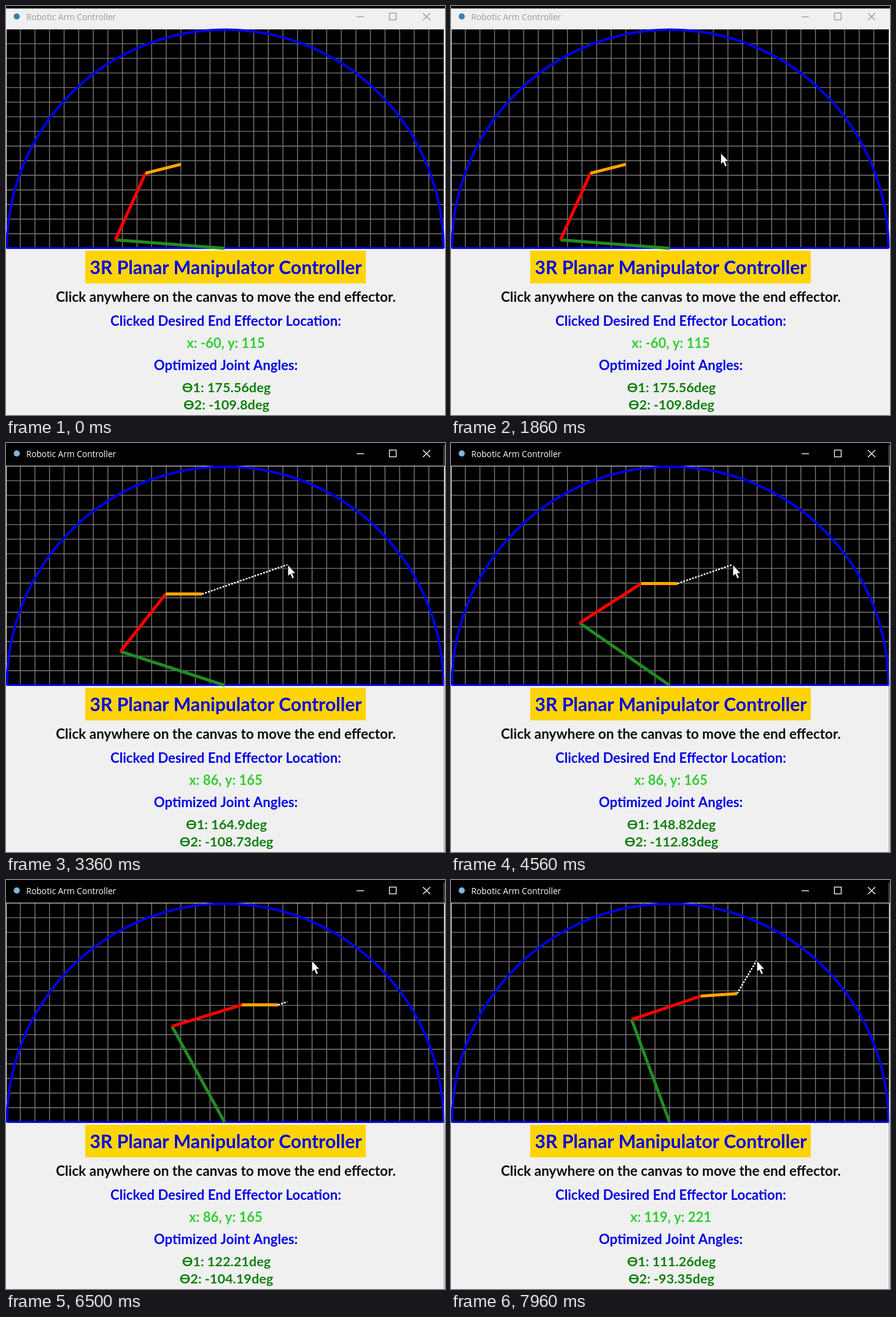
An HTML page with a canvas for the animation above (8 s loop, 715 by 665 pixels).

```html
<!DOCTYPE html>
<html lang="en">
<head>
<meta charset="utf-8">
<title>Robotic Arm Controller</title>
<style>
html, body { margin: 0; width: 100%; height: 100%; overflow: hidden; background: #f0f0f0; }
canvas { display: block; }
</style>
</head>
<body>
<canvas id="stage" width="715" height="665"></canvas>
<script>
const ctx = document.getElementById('stage').getContext('2d');
const LOOP = 8000;
const FACE = '#f0f0f0';
const GRID = '#787878';
const BLUE = '#0000e8';
const GREEN = '#108010';
const BASE = { x: 356, y: 394 };
const SCALE = 1.188;
const LINKS = [150, 100, 50];
const WAYPOINTS = 7;
const SUBSTEPS = 5;
const REST = 0.4; // where the arm lingers between two waypoints
const DEG = Math.PI / 180;

const START = { x: -60, y: 115 };
const FIRST = { x: 86, y: 165 };
const SECOND = { x: 119, y: 221 };

// Keys are [time, share of the path]; tilt is the angle of the last link.
const moves = [
  {
    from: START, to: FIRST,
    keys: [[2640, 0], [3360, 0.2], [4560, 17 / 35], [6500, 32 / 35], [6880, 1]],
    tilt: s => 14.126 * Math.max(0, 1 - s * WAYPOINTS)
  },
  {
    from: FIRST, to: SECOND,
    keys: [[7150, 0], [7960, 0.2], [8100, 0.23]],
    tilt: s => 19.7 * s
  }
];

const cursorKeys = [
  [700, 345, 640], [1200, 385, 351], [2200, 459, 198],
  [5500, 459, 198], [6200, 498, 131]
];

const lerp = (a, b, u) => a + (b - a) * u;
const smooth = u => u * u * (3 - 2 * u);

function sample(keys, t, col, ease = u => u) {
  if (t <= keys[0][0]) return keys[0][col];
  for (let i = 1; i < keys.length; i++) {
    const [a, b] = [keys[i - 1], keys[i]];
    if (t <= b[0]) return lerp(a[col], b[col], ease((t - a[0]) / (b[0] - a[0])));
  }
  return keys[keys.length - 1][col];
}

// Small steps taken so far: half of each segment's time is spent at rest.
function stepsAt(s) {
  if (s <= 0) return 0;
  const u = s * WAYPOINTS - REST;
  const n = Math.round(u);
  const off = u - n;
  const moved = Math.sign(off) * Math.max(0, Math.abs(off) - 0.25) * 2;
  return Math.min(WAYPOINTS * SUBSTEPS, Math.round((n + moved + REST) * SUBSTEPS));
}

// Joint angles and positions for a share s of the path.
function pose(move, s) {
  const tip = { x: lerp(move.from.x, move.to.x, s), y: lerp(move.from.y, move.to.y, s) };
  const phi = move.tilt(s) * DEG;
  const wrist = { x: tip.x - LINKS[2] * Math.cos(phi), y: tip.y - LINKS[2] * Math.sin(phi) };
  const [a, b] = LINKS;
  const c = (wrist.x ** 2 + wrist.y ** 2 - a * a - b * b) / (2 * a * b);
  const q2 = -Math.acos(Math.max(-1, Math.min(1, c)));
  const q1 = Math.atan2(wrist.y, wrist.x) - Math.atan2(b * Math.sin(q2), a + b * Math.cos(q2));
  const elbow = { x: a * Math.cos(q1), y: a * Math.sin(q1) };
  return { q1: q1 / DEG, q2: q2 / DEG, joints: [{ x: 0, y: 0 }, elbow, wrist, tip] };
}

const toPx = p => [BASE.x + p.x * SCALE, BASE.y - p.y * SCALE];

function line(x1, y1, x2, y2, color, width) {
  ctx.strokeStyle = color;
  ctx.lineWidth = width;
  ctx.beginPath();
  ctx.moveTo(x1, y1);
  ctx.lineTo(x2, y2);
  ctx.stroke();
}

function rect(x, y, w, h, color) {
  ctx.fillStyle = color;
  ctx.fillRect(x, y, w, h);
}

function text(str, x, y, size, color, font = '700', family = 'Lato', align = 'center') {
  ctx.font = `${font} ${size}px ${family}, sans-serif`;
  ctx.textAlign = align;
  ctx.fillStyle = color;
  ctx.fillText(str, x, y);
}

function drawTitleBar(active) {
  const ink = active ? '#fff' : '#999';
  rect(0, 0, 715, 37, active ? '#000' : FACE);
  if (!active) rect(0, 0, 715, 4, '#000');
  ctx.fillStyle = active ? '#7fb4dc' : '#3a7fa8';
  ctx.beginPath();
  ctx.arc(17.5, 17, 5, 0, Math.PI * 2);
  ctx.fill();
  text('Robotic Arm Controller', 33, 23, 13.7, ink, '400', 'Open Sans', 'left');
  line(571, 17.5, 583, 17.5, ink, 1.3);
  ctx.strokeRect(624.5, 11.5, 11, 11);
  line(679, 11.5, 691, 23, ink, 1.3);
  line(691, 11.5, 679, 23, ink, 1.3);
}

function drawField() {
  rect(1, 38, 712, 357, '#000');
  const step = 20 * SCALE;
  for (let k = -14; k <= 14; k++) {
    const x = BASE.x + k * step;
    line(x, 38, x, 394, GRID, 1.4);
  }
  for (let k = 1; k < 15; k++) {
    const y = BASE.y - k * step;
    line(1, y, 713, y, GRID, 1.4);
  }
  line(1, 393.5, 713, 393.5, BLUE, 3);
  ctx.strokeStyle = BLUE;
  ctx.lineWidth = 4;
  ctx.beginPath();
  ctx.arc(357, 394, 355.5, Math.PI, Math.PI * 2);
  ctx.stroke();
}

function drawArm(joints, goal) {
  const pts = joints.map(toPx);
  if (goal) {
    ctx.setLineDash([3, 2]);
    line(...pts[3], ...toPx(goal), '#fff', 2.4);
    ctx.setLineDash([]);
  }
  ['#228b22', '#ff0000', '#ffa500'].forEach((color, i) => line(...pts[i], ...pts[i + 1], color, 5));
}

function drawPanel(goal, q1, q2) {
  const mid = 358;
  const deg = v => `${+v.toFixed(2)}deg`;
  rect(129, 398, 457, 53, '#ffd500');
  text('3R Planar Manipulator Controller', mid, 436, 30.1, BLUE);
  text('Click anywhere on the canvas to move the end effector.', mid, 481, 22.5, '#0c0c0c');
  text('Clicked Desired End Effector Location:', mid, 520, 22.1, BLUE);
  text(`x: ${goal.x}, y: ${goal.y}`, mid, 556, 22, '#32cd32');
  text('Optimized Joint Angles:', mid, 592, 22.2, BLUE);
  text(`Ɵ1: ${deg(q1)}`, mid + 1, 628, 21.7, GREEN);
  text(`Ɵ2: ${deg(q2)}`, mid + 1, 656, 21.7, GREEN);
}

function drawCursor(x, y) {
  const shape = [[0, 0], [0, 19], [4, 15.2], [7.2, 22.5], [10.5, 21], [7.4, 14], [13, 14]];
  ctx.beginPath();
  shape.forEach(([dx, dy]) => ctx.lineTo(x + dx, y + dy));
  ctx.closePath();
  ctx.fillStyle = '#fff';
  ctx.fill();
  ctx.strokeStyle = '#000';
  ctx.lineWidth = 1;
  ctx.stroke();
}

function render(t) {
  const started = t >= moves[0].keys[0][0];
  const move = t >= moves[1].keys[0][0] ? moves[1] : moves[0];
  const total = WAYPOINTS * SUBSTEPS;
  const step = stepsAt(sample(move.keys, t, 1));
  const arm = pose(move, step / total);
  const solved = Math.floor(step / SUBSTEPS);
  const shown = move === moves[0] && solved === 0
    ? { q1: 175.56, q2: -109.8 }
    : pose(move, solved / WAYPOINTS);

  rect(0, 0, 715, 665, FACE);
  drawTitleBar(started);
  drawField();
  drawArm(arm.joints, started && step < total ? move.to : null);
  drawPanel(started ? move.to : START, shown.q1, shown.q2);
  if (started) line(713.5, 4, 713.5, 665, '#8c8c8c', 1);
  if (t >= cursorKeys[0][0]) {
    drawCursor(sample(cursorKeys, t, 1, smooth), sample(cursorKeys, t, 2, smooth));
  }
}

const begin = performance.now();
function tick() {
  render((performance.now() - begin) % LOOP);
  requestAnimationFrame(tick);
}
tick();
</script>
</body>
</html>
```
